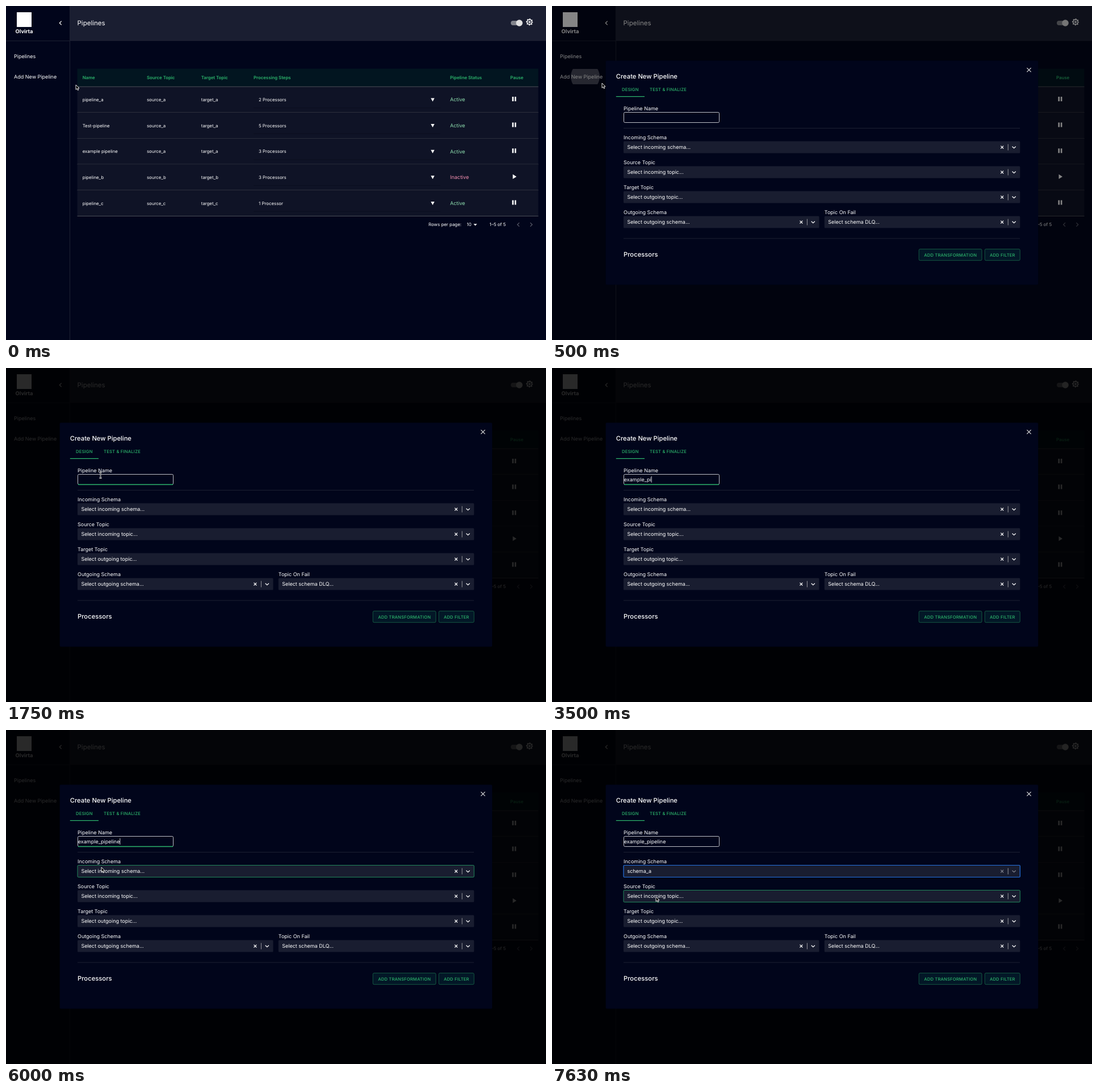
These frames come from a looping animation (951 by 589 pixels, 8 s). An HTML page:

```html
<!DOCTYPE html>
<html lang="en">
<head>
<meta charset="utf-8">
<title>Pipelines</title>
<style>
  html, body { margin: 0; width: 100%; height: 100%; overflow: hidden; background: #01051b; }
  svg { display: block; width: 100%; height: 100%; font-family: Inter, sans-serif; text-rendering: geometricPrecision; }
  text { white-space: pre; }
</style>
</head>
<body>
<svg id="stage" viewBox="0 0 951 589"></svg>
<script>
const NAVY = '#01051b', FIELD = '#191d30', GREEN = '#2cb56c', LINE = '#1d2132';
const LOOP = 8000, STEP = 125;

// Markup helpers; text is placed by the vertical centre of its capitals.
const text = (x, y, str, size = 9, fill = '#fff', extra = '') =>
  `<text x="${x}" y="${y + size * 0.36}" font-size="${size}" fill="${fill}" ${extra}>${str}</text>`;
const rect = (x, y, w, h, fill, extra = '') =>
  `<rect x="${x}" y="${y}" width="${w}" height="${h}" fill="${fill}" ${extra}/>`;
const stroke = (d, color, width = 1, extra = '') =>
  `<path d="${d}" fill="none" stroke="${color}" stroke-width="${width}" ${extra}/>`;
const shape = (d, fill = '#fff') => `<path d="${d}" fill="${fill}"/>`;
const chevron = (x, y, dir, color) =>
  stroke(`M${x - 1.7 * dir} ${y - 3.4}l${3.4 * dir} 3.4l${-3.4 * dir} 3.4`, color, 1.2);
const bold = 'font-weight="600"', medium = 'font-weight="500"';
const caps = medium + ' letter-spacing=".21"';

function sidebar() {
  return stroke('M112.5 0V589M0 61.5H112', LINE) +
    rect(19, 11, 26, 26, '#fff') +
    text(32, 45, 'Olvirta', 9.4, '#fff', 'font-weight="700" text-anchor="middle"') +
    chevron(96, 30, -1, '#fff') +
    text(14, 88.5, 'Pipelines') + text(14, 124.8, 'Add New Pipeline') +
    `<clipPath id="button"><path d="M0 111H112V138H0Z"/></clipPath>
     <circle id="ripple" cx="58.5" cy="124.5" fill="#fff" clip-path="url(#button)"/>`;
}

function header() {
  return rect(113, 0, 838, 61, '#1a1e31') + stroke('M113 61H951', '#262a3b', .8) +
    text(125.5, 30, 'Pipelines', 11.5) +
    rect(889, 26, 20, 8, '#82848c', 'rx="4"') + '<circle cx="904" cy="30" r="5.8" fill="#e0e0e0"/>' +
    `<g fill="none" stroke="#fff" transform="translate(922 28.2)">
      <circle r="5.2" stroke-width="1.8" stroke-dasharray="2.04" stroke-dashoffset="1"/>
      <circle r="4.1" stroke-width="1.5"/><circle r="1.3" stroke-width="1.3"/></g>`;
}

function row([name, topic, steps, active = true], i) {
  const y = 165.2 + i * 45.65;
  return rect(125.5, y - 23, 812, 45.65, '#0f1326') +
    stroke(`M436 ${y + 14.5}H765`, '#0b0e1f', 1) +
    stroke(`M125.5 ${y + 22.7}H937.5`, '#4b4d55', 1) +
    text(134.7, y, name, 7.8) + text(248, y, 'source_' + topic, 7.8) + text(343.8, y, 'target_' + topic, 7.8) +
    text(445, y, steps, 7.85) + shape(`M748.2 ${y - 2.8}h6.4l-3.2 6z`) +
    text(782, y, active ? 'Active' : 'Inactive', 9, active ? '#8fe0b0' : '#f48fb1') +
    (active ? shape(`M891.4 ${y - 5.3}h2.6v8h-2.6zm4.4 0h2.6v8h-2.6z`)
            : shape(`M892.5 ${y - 5.3}v8.2l6.5 -4.1z`));
}

function table() {
  const heads = [[134.7, 'Name'], [248, 'Source Topic'], [343.8, 'Target Topic'],
    [436, 'Processing Steps'], [782, 'Pipeline Status'], [888, 'Pause']];
  const rows = [['pipeline_a', 'a', '2 Processors'], ['Test-pipeline', 'a', '5 Processors'],
    ['example pipeline', 'a', '3 Processors'], ['pipeline_b', 'b', '3 Processors', false],
    ['pipeline_c', 'c', '1 Processor']];
  return rect(125.5, 110.5, 812, 32, '#021520') +
    heads.map(([x, label]) => text(x, 126.3, label, 7.8, GREEN, bold)).join('') +
    rows.map(row).join('') + stroke('M125.5 142.3H937.5', '#4b4d55') +
    text(744, 385.5, 'Rows per page:', 7.9) + text(811.5, 385.5, '10', 7.9) +
    shape('M823.4 384.3h6.2l-3.1 3.1z') + text(851.5, 385.5, '1–5 of 5', 7.9) +
    chevron(902.3, 385.5, -1, '#5a5d6b') + chevron(925, 385.5, 1, '#5a5d6b');
}

const selects = [
  ['incoming', 126, 238.5, 698.3, 'Incoming Schema', 'Select incoming schema...'],
  ['source', 126, 282.5, 698.3, 'Source Topic', 'Select incoming topic...'],
  ['target', 126, 326.5, 698.3, 'Target Topic', 'Select outgoing topic...'],
  ['outgoing', 126, 370.5, 344.5, 'Outgoing Schema', 'Select outgoing schema...'],
  ['fail', 479.8, 370.5, 344.5, 'Topic On Fail', 'Select schema DLQ...'],
];

function select([id, x, y, w, label, hint]) {
  const right = x + w, mid = y + 10.6;
  return text(x, y - 7.1, label) + rect(x, y, w, 21, FIELD, `id="${id}" rx="1.5"`) +
    text(x + 6.4, mid, hint, 9, '#fff', `id="${id}Text"`) +
    `<g id="${id}Icons">` +
    stroke(`M${right - 34} ${mid - 2.4}l4.8 4.8m0 -4.8l-4.8 4.8`, '#fff', 1.2) +
    stroke(`M${right - 13.8} ${mid - 1.4}l3.1 3l3.1 -3`, '#fff', 1.2) + '</g>' +
    stroke(`M${right - 21.1} ${mid - 5.5}v11`, '#ccc', .7);
}

const button = (x, w, label) =>
  rect(x + .5, 428.7, w - 1, 20, '#031727', 'rx="2" stroke="#1a6c4b" stroke-width=".8"') +
  text(x + w / 2 + .1, 438.8, label, 7.55, GREEN, caps + ' text-anchor="middle"');

function modal() {
  return rect(94.6, 96.6, 761.6, 394.8, NAVY, 'rx="2"') +
    text(112.8, 124.1, 'Create New Pipeline', 11.2, '#fff', medium) +
    stroke('M836.4 109.2l7.2 7.2m0 -7.2l-7.2 7.2', '#ddd', 1.2) +
    text(123, 146.8, 'DESIGN', 7.6, GREEN, caps) + text(172, 146.8, 'TEST &amp; FINALIZE', 7.6, GREEN, caps) +
    stroke('M112.8 159.6H163', GREEN, 1.2) +
    text(126, 180.5, 'Pipeline Name') +
    rect(126.5, 187.5, 168, 18, NAVY, 'rx="2" stroke="#d4d5da" stroke-width=".9"') +
    stroke('M127 205.5H294', GREEN, 1.3, 'id="focusLine"') +
    text(126.8, 196.6, '', 9, '#fff', 'id="typed"') +
    rect(0, 191, .8, 11, '#fff', 'id="caret"') +
    stroke('M126 215.5H824M126 410H824', LINE) +
    selects.map(select).join('') +
    text(126, 437.6, 'Processors', 11.25, '#fff', medium) +
    button(645.7, 111.8, 'ADD TRANSFORMATION') + button(761.7, 63, 'ADD FILTER');
}

function menu() {
  return rect(125.5, 268, 699, 69.5, '#000', 'opacity=".4" rx="2"') +
    rect(126, 266.7, 698.3, 68.6, FIELD, 'rx="2"') + rect(126, 266.7, 698.3, 22.8, '#222737') +
    ['schema_a', 'schema_b', 'schema_c'].map((s, i) => text(133, 278.2 + i * 22.5, s)).join('');
}

const beamPath = 'M-2 -5Q0 -5 0 -3.6Q0 -5 2 -5M0 -4V4M-2 5Q0 5 0 3.6Q0 5 2 5';
const stage = document.getElementById('stage');
stage.innerHTML = rect(0, 0, 951, 589, NAVY) + sidebar() + header() + table() +
  rect(0, 0, 951, 589, '#000', 'id="backdrop"') +
  `<g id="modal">${modal()}</g><g id="menu">${menu()}</g><g id="cursor">
    <path id="arrow" d="M0 0V8.4L2 6.6L3.4 9.7L4.8 9L3.5 6H6.1Z" fill="#000" stroke="#fff" stroke-width=".9"/>
    <g id="beam">${stroke(beamPath, '#fff', 1.8)}${stroke(beamPath, '#222', .7)}</g></g>`;

const el = id => document.getElementById(id);
const set = (id, attrs) => Object.entries(attrs).forEach(([k, v]) => el(id).setAttribute(k, v));
const show = (id, on) => set(id, { display: on ? 'inline' : 'none' });

// Everything below is timed in steps of 125 ms.
const NAME = 'example_pipeline';
const keyTimes = [17, 19, 20, 21, 22, 23, 24, 25, 27, 28, 30, 32, 34, 37, 37, 38];
const pointer = [[0, 123, 139], [1, 98, 133], [2, 66, 126], [3, 72, 130], [4, 88, 136], [7, 88, 136],
  [12, 166.5, 189], [43, 166.5, 189], [44, 166.5, 196], [46, 167, 225], [47, 168, 240], [48, 168, 242],
  [49, 168, 242], [55, 178, 272], [56, 178, 273], [58, 178, 273], [61, 183, 294]];
const dimming = [[2, 0], [3, .15], [4, .48], [5, .69], [6, .8], [7, .84]];
const modalFade = [[2, 0], [3, .5], [4, 1]];
const rippleSize = [[1, 0], [2, 12], [3, 20], [4, 25.5], [6, 28]];
const rippleFade = [[1, .28], [4, .28], [7, 0]];

function track(keys, s) {
  const next = keys.findIndex(k => k[0] > s);
  if (next < 0) return keys.at(-1).slice(1);
  if (next === 0) return keys[0].slice(1);
  const a = keys[next - 1], b = keys[next], p = (s - a[0]) / (b[0] - a[0]);
  return a.slice(1).map((v, i) => v + (b[i + 1] - v) * p);
}

function render(s) {
  set('backdrop', { opacity: track(dimming, s)[0] });
  set('modal', { opacity: track(modalFade, s)[0] });
  set('ripple', { r: track(rippleSize, s)[0], opacity: track(rippleFade, s)[0] });

  const inputFocused = s >= 14 && s < 50, selectFocused = s >= 50, menuOpen = s >= 50 && s < 59;
  el('typed').textContent = NAME.slice(0, keyTimes.filter(k => k <= s).length);
  set('caret', { x: 126.8 + el('typed').getComputedTextLength() });
  show('caret', inputFocused && s >= 17 && !(s >= 42 && s < 46));
  show('focusLine', inputFocused);
  show('menu', menuOpen);

  const [x, y] = track(pointer, s);
  const overInput = s >= 4 && x > 126 && x < 295 && y > 187 && y < 206;
  set('cursor', { transform: `translate(${x} ${y})` });
  show('cursor', s < 17 || s >= 44);
  show('arrow', !overInput);
  show('beam', overInput);

  for (const [id, left, top, width] of selects) {
    const hovered = s >= 4 && !menuOpen && x > left && x < left + width && y > top && y < top + 21;
    const focused = id === 'incoming' && selectFocused;
    set(id, { stroke: focused ? '#2472e0' : hovered ? '#27a567' : 'none', 'stroke-width': focused ? 1.2 : .8 });
    set(id + 'Icons', { opacity: focused ? .45 : 1 });
  }
  el('incomingText').textContent = s >= 59 ? 'schema_a' : 'Select incoming schema...';
}

function frame() {
  render(Math.floor(performance.now() % LOOP / STEP));
  requestAnimationFrame(frame);
}
frame();
</script>
</body>
</html>
```
